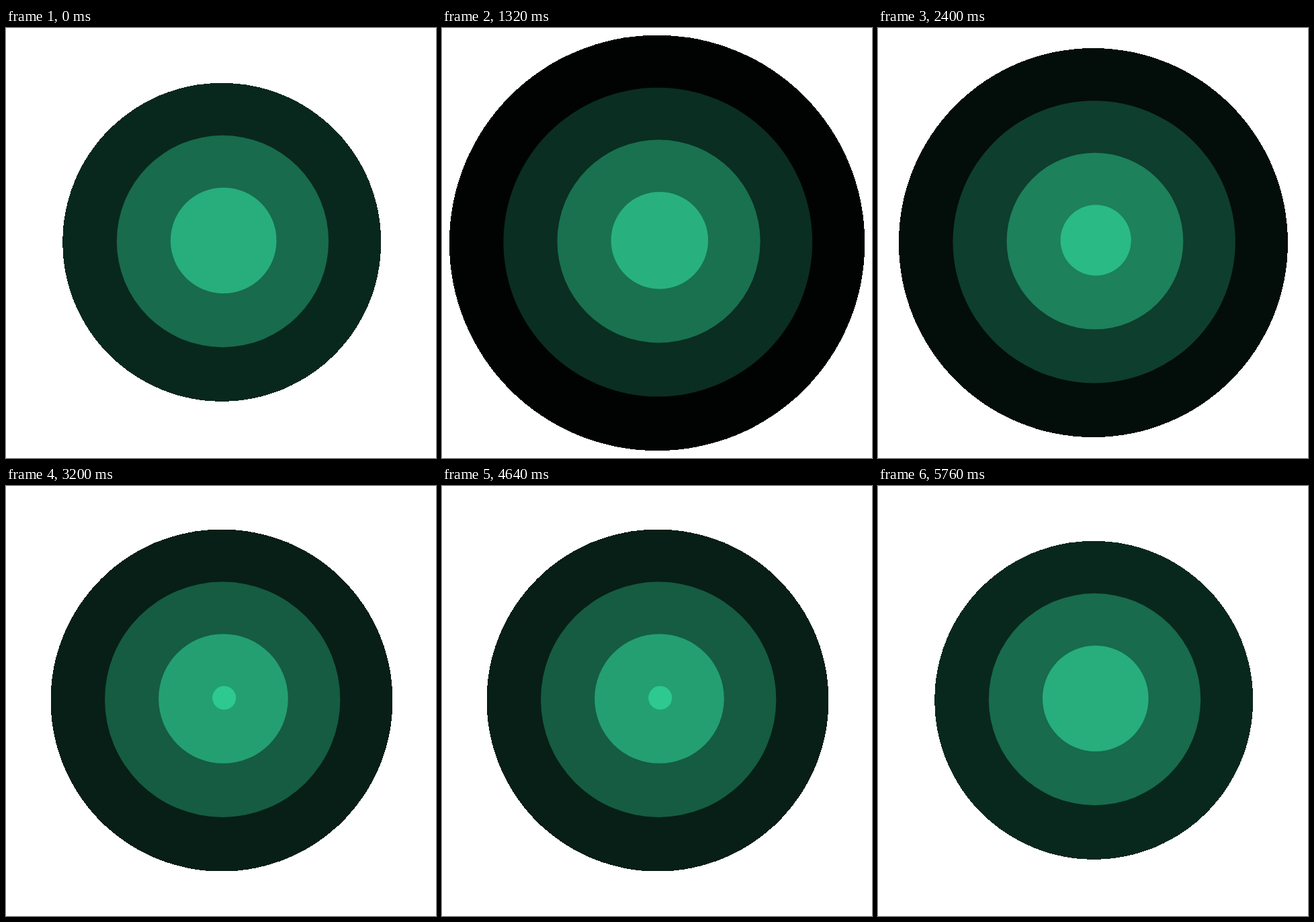
Recreate the animation shown at these times as an HTML page. Size 640x640 px, loop 5.8 s.

```html
<!DOCTYPE html>
<html lang="en">
<head>
<meta charset="utf-8">
<title>Growing rings</title>
<style>
  html, body { margin: 0; width: 100%; height: 100%; overflow: hidden; background: #fff; }
  svg { display: block; width: 100%; height: 100%; }
</style>
</head>
<body>
<svg viewBox="0 0 640 640">
  <!-- Makes every touched pixel opaque, for a hard outer rim -->
  <filter id="hard" filterUnits="userSpaceOnUse" x="0" y="0" width="640" height="640"
          color-interpolation-filters="sRGB">
    <feComponentTransfer><feFuncA type="linear" slope="255"/></feComponentTransfer>
  </filter>
  <circle filter="url(#hard)"/>
  <circle/>
  <circle/>
  <circle/>
</svg>
<script>
  const STEP = 40, LOOP = 5800, CYCLE = 36;
  const MAX_R = 315.3, SHIFT = 5;
  const circles = [...document.querySelectorAll('circle')];
  const rings = circles.length;

  const mix = (a, b, t) => a + (b - a) * t;

  // Slow fade, faster through the middle half, slow again to black
  function green(p) {
    if (p < 0.25) return mix(209, 174, p * 4);
    if (p < 0.75) return mix(174, 40, p * 2 - 0.5);
    return mix(40, 0, p * 4 - 3);
  }

  function shade(p) {
    const g = green(p);
    return `rgb(${[g * 0.225, g, g * 0.715].map(Math.round)})`;
  }

  function draw(time) {
    const phase = Math.floor(time % LOOP / STEP) % CYCLE / CYCLE;
    circles.forEach((circle, i) => {
      const p = (phase + rings - 1 - i) / rings;
      const offset = SHIFT * (1 - p);
      circle.setAttribute('cx', 320 + offset);
      circle.setAttribute('cy', 320 - offset);
      circle.setAttribute('r', MAX_R * p);
      circle.setAttribute('fill', shade(p));
    });
  }

  const start = performance.now();
  function loop() {
    draw(performance.now() - start);
    requestAnimationFrame(loop);
  }
  loop();
</script>
</body>
</html>
```
